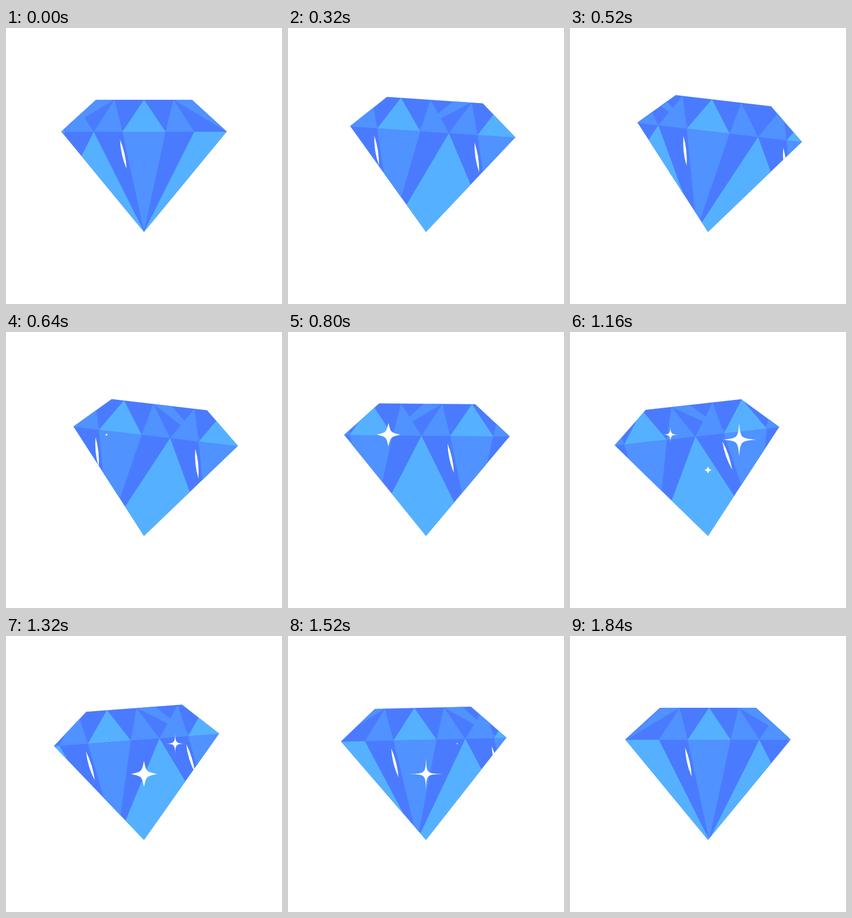
An HTML page with a canvas for the animation above (2080 ms loop, 500x500 px).

```html
<!DOCTYPE html>
<html>
<head>
<meta charset="utf-8">
<style>
  html, body { margin: 0; width: 100%; height: 100%; overflow: hidden; background: #fff; }
  canvas { display: block; }
</style>
</head>
<body>
<canvas id="stage" width="500" height="500"></canvas>
<script>
const ctx = document.getElementById('stage').getContext('2d');
const DARK = '#4a7bff', MID = '#5092ff', LIGHT = '#55b1ff';
const TOP = 130, GIRDLE = 188, TIP = 369;
const PERIOD = 182, LAST = 5;
const LOOP = 2080, STEP = 40, END = 1840;
// Which way the upper side facet leans in each gap: 1 right, -1 left, 0 hidden.
const LEAN = [1, -1, 1, 0, -1];
const SPARKS = [[182, 186, 620], [306.5, 195, 830], [250, 250, 1110]];
const SPARK_LIFE = 720;

function trace(...p) {
  ctx.beginPath();
  for (let i = 0; i < p.length; i += 2) ctx.lineTo(p[i], p[i + 1]);
  ctx.closePath();
}

function poly(color, ...p) {
  trace(...p);
  ctx.fillStyle = color;
  ctx.fill();
}

// Cubic Bezier easing (.33, 0, .23, 1), solved by bisection.
function ease(x) {
  let lo = 0, hi = 1;
  for (let i = 0; i < 30; i++) {
    const s = (lo + hi) / 2, u = 1 - s;
    if (3 * u * u * s * .33 + 3 * u * s * s * .23 + s * s * s < x) lo = s;
    else hi = s;
  }
  return lo * lo * (3 - 2 * lo);
}

function tilt(t) {
  const swing = (a, b) => Math.cos(Math.PI * (t - a) / (b - a));
  if (t < 600) return 3.5 * (1 - swing(0, 600));
  if (t < 1020) return 7 * swing(600, 1020);
  if (t < 1720) return -3.5 * (1 + swing(1020, 1720));
  return 0;
}

function sideFacet(c, dir) {
  poly(MID, c + 54 * dir, TOP, c + 87 * dir, TOP, c + 150 * dir, GIRDLE);
}

function gem(c) {
  for (const d of [-1, 1])
    poly(MID, c + 53.5 * d, TOP, c + 39 * d, GIRDLE, c + 91 * d, GIRDLE);
  poly(LIGHT, c, TOP, c - 39, GIRDLE, c + 39, GIRDLE);
  poly(MID, c - 39, GIRDLE, c + 39, GIRDLE, c, TIP);

  ctx.beginPath();
  ctx.moveTo(c - 43.5, 202);
  ctx.quadraticCurveTo(c - 42.5, 230, c - 31.5, 255);
  ctx.quadraticCurveTo(c - 33, 227, c - 43.5, 202);
  ctx.fillStyle = '#fff';
  ctx.fill();
}

function strip(first) {
  const last = first + LAST * PERIOD;
  sideFacet(first, -1);
  sideFacet(last, 1);
  poly(LIGHT, first - 91, GIRDLE, first - 400, GIRDLE, first - 400, TIP, first, TIP);
  poly(LIGHT, last + 91, GIRDLE, last + 400, GIRDLE, last + 400, TIP, last, TIP);
  LEAN.forEach((lean, k) => {
    const c = first + k * PERIOD;
    if (lean) sideFacet(lean > 0 ? c : c + PERIOD, lean);
    poly(LIGHT, c + 91, GIRDLE, c, TIP, c + PERIOD, TIP);
  });
  for (let k = 0; k <= LAST; k++) gem(first + k * PERIOD);
}

function sparkle(x, y, p) {
  if (p <= 0 || p >= 1) return;
  const r = 30 * Math.sin(Math.PI * p);
  const w = r * Math.max(0, .32 - .5 * p);
  ctx.save();
  ctx.translate(x, y);
  ctx.beginPath();
  ctx.moveTo(r, 0);
  for (const [a, b, ex, ey] of [[1, 1, 0, r], [-1, 1, -r, 0], [-1, -1, 0, -r], [1, -1, r, 0]])
    ctx.bezierCurveTo(a * w, b * w, a * w, b * w, ex, ey);
  ctx.fillStyle = '#fff';
  ctx.fill();
  ctx.restore();
}

function draw(now) {
  const t = Math.min(END, Math.floor(now % LOOP / STEP) * STEP);
  ctx.fillStyle = '#fff';
  ctx.fillRect(0, 0, 500, 500);

  ctx.save();
  ctx.translate(250, TIP);
  ctx.rotate(tilt(t) * Math.PI / 180);
  ctx.translate(-250, -TIP);
  trace(163, TOP, 337, TOP, 400, 187.5, 250, TIP + .5, 100, 187.5);
  ctx.clip();
  ctx.fillStyle = DARK;
  ctx.fillRect(0, 0, 500, 500);
  strip(-660 + 912 * ease(t / END));
  ctx.restore();

  for (const [x, y, start] of SPARKS) sparkle(x, y, (t - start) / SPARK_LIFE);
}

const begin = performance.now();
function tick() {
  draw(performance.now() - begin);
  requestAnimationFrame(tick);
}
tick();
</script>
</body>
</html>
```
